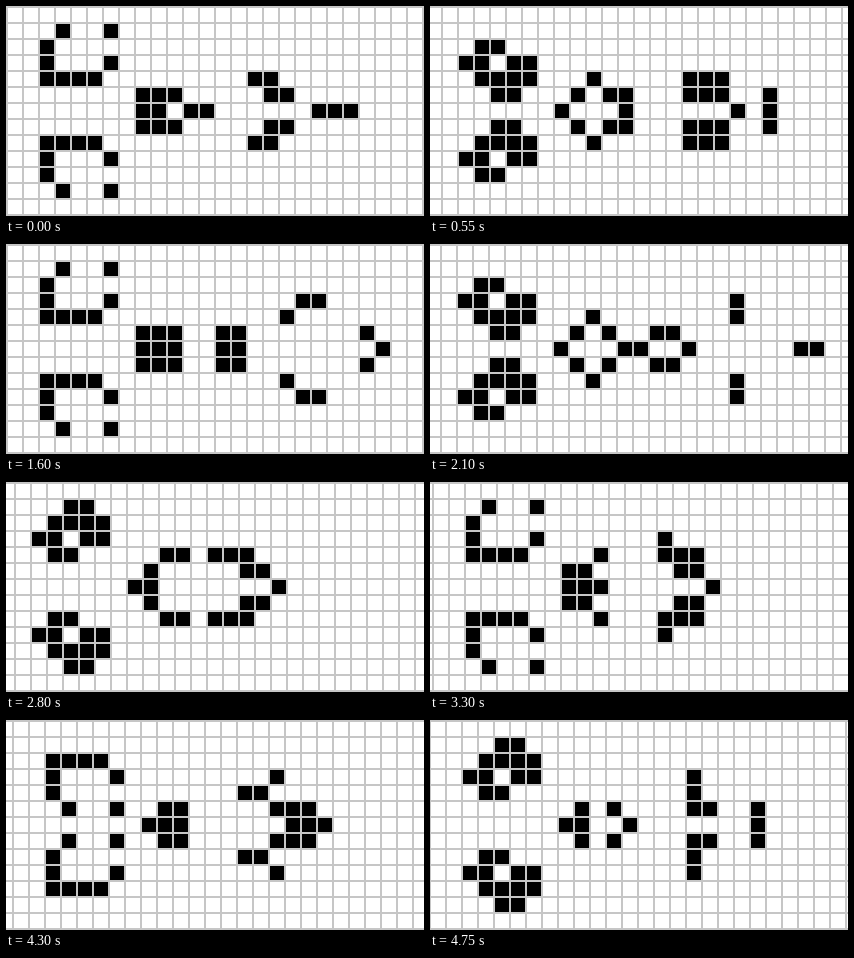
Recreate the animation shown at these times as a matplotlib script. Size 418x210 px, loop 4800 ms.

```python
import numpy as np
import matplotlib.pyplot as plt
from matplotlib.animation import FuncAnimation

W, H, DPI = 418, 210, 64
CELL, LINE = 16, 2
COLS, ROWS = 26, 13
PAD = 10
FRAMES, HOLD = 96, 8          # one generation lasts HOLD frames
GRAY, WHITE, BLACK = 198, 255, 0

# Upper half and axis row of a Schick engine: row -> live columns
SHIP = {
    1: [3, 6],
    2: [2],
    3: [2, 6],
    4: [2, 3, 4, 5, 15, 16],
    5: [8, 9, 10, 16, 17],
    6: [8, 9, 11, 12, 19, 20, 21],
}


def seed():
    world = np.zeros((ROWS + 2 * PAD, COLS + 2 * PAD), dtype=int)
    for row, cols in SHIP.items():
        for r in (row, ROWS - 1 - row):
            world[r + PAD, np.array(cols) + PAD] = 1
    return world


def step(world):
    near = sum(np.roll(world, (dy, dx), (0, 1))
               for dy in (-1, 0, 1) for dx in (-1, 0, 1)) - world
    return ((near == 3) | ((world == 1) & (near == 2))).astype(int)


generations = [seed()]
while len(generations) < FRAMES // HOLD:
    generations.append(step(generations[-1]))

ys, xs = np.arange(H), np.arange(W)


def render(k):
    """The camera drifts left one pixel per frame, keeping pace with the ship."""
    x = xs - k
    alive = generations[k // HOLD][np.ix_(ys // CELL + PAD, x // CELL + PAD)]
    pixels = np.where(alive == 1, BLACK, WHITE)
    pixels[ys % CELL < LINE, :] = GRAY
    pixels[:, x % CELL < LINE] = GRAY
    return pixels.astype(np.uint8)


fig = plt.figure(figsize=(W / DPI, H / DPI), dpi=DPI)
ax = fig.add_axes([0, 0, 1, 1])
ax.axis("off")
board = ax.imshow(render(0), cmap="gray", vmin=0, vmax=255,
                  interpolation="nearest", aspect="auto")


def update(k):
    board.set_data(render(k))
    return [board]


anim = FuncAnimation(fig, update, frames=FRAMES, interval=50,
                     repeat=True, repeat_delay=0, blit=False)
plt.show()
```
